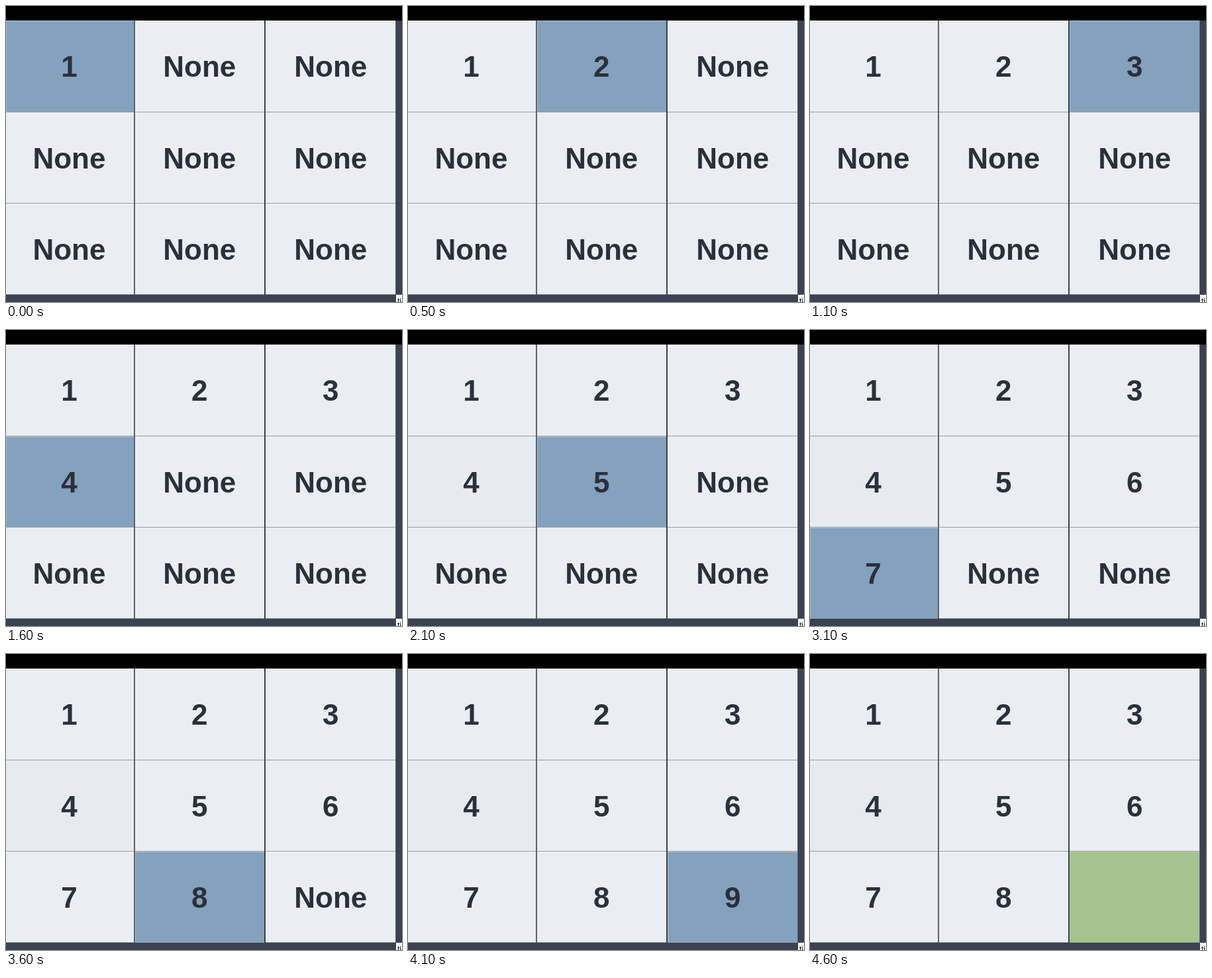
These frames come from a looping animation (598 px wide and 448 px high, 4.9 s). An HTML page:

```html
<!DOCTYPE html>
<html lang="en">
<head>
<meta charset="utf-8">
<title>Grid fill</title>
<style>
  html, body { margin: 0; width: 100%; height: 100%; overflow: hidden; background: #3b4252; }
  svg { display: block; width: 598px; height: 448px; }
  rect { shape-rendering: crispEdges; }
  .value { font: bold 44px "Liberation Sans", Arial, sans-serif; text-anchor: middle; fill: #2b303c; }
  .corner { font: 12px "Liberation Sans", Arial, sans-serif; fill: #111; }
</style>
</head>
<body>
<svg id="stage" viewBox="0 0 598 448"></svg>
<script>
const LOOP = 4900;
const STARTS = [0, 500, 1100, 1600, 2100, 2600, 3100, 3600, 4100];
const DONE = 4600;
const COLUMNS = [
  { x: 0, width: 193, center: 95.4 },
  { x: 195, width: 195, center: 292.3 },
  { x: 392, width: 196, center: 490.3 }
];
const ROWS = [
  { y: 23, height: 137, baseline: 107 },
  { y: 161, height: 137, baseline: 245.5 },
  { y: 299, height: 137, baseline: 384 }
];
const PLAIN = '#eaedf2', VISITED = '#e7eaef', ACTIVE = '#84a1bd', FINISHED = '#a5c38e';
const stage = document.getElementById('stage');

function add(tag, attributes, text = '') {
  const node = document.createElementNS('http://www.w3.org/2000/svg', tag);
  for (const [key, value] of Object.entries(attributes)) node.setAttribute(key, value);
  node.textContent = text;
  return stage.appendChild(node);
}

function box(x, y, width, height, fill) {
  return add('rect', { x, y, width, height, fill });
}

box(0, 0, 598, 22, '#000');
box(0, 22, 588, 415, PLAIN);

const cells = STARTS.map((start, index) => {
  const column = COLUMNS[index % 3], row = ROWS[Math.floor(index / 3)];
  return {
    start,
    end: STARTS[index + 1] ?? LOOP,
    visited: index === 3 ? VISITED : PLAIN,
    fill: box(column.x, row.y, column.width, row.height, PLAIN),
    top: box(column.x, row.y - (row.y === 23 ? 1 : 0), column.width, 1, '#b3c7da'),
    left: box(column.x, row.y, 1, row.height, '#a3bad0'),
    label: add('text', { class: 'value', x: column.center, y: row.baseline })
  };
});

for (const y of [160, 298, 436]) box(0, y, 588, 1, '#9b9da1');
box(193, 22, 2, 415, '#5f6369');
box(390, 22, 2, 415, '#3a3f49');
box(588, 22, 1, 415, '#5d6370');
box(589, 437, 9, 11, '#f4f5f6');
add('text', { class: 'corner', x: 591, y: 451 }, 'ti');

function draw(time) {
  cells.forEach((cell, index) => {
    const reached = time >= cell.start;
    const active = reached && time < cell.end;
    const finished = index === 8 && time >= DONE;
    const edge = active ? 'visible' : 'hidden';
    cell.fill.setAttribute('fill',
      finished ? FINISHED : active ? ACTIVE : reached ? cell.visited : PLAIN);
    cell.top.setAttribute('visibility', edge);
    cell.left.setAttribute('visibility', edge);
    cell.top.setAttribute('fill', finished ? '#c3d6b4' : '#b3c7da');
    cell.left.setAttribute('fill', finished ? '#b8cfa6' : '#a3bad0');
    cell.label.textContent = finished ? '' : reached ? index + 1 : 'None';
  });
}

const origin = performance.now();
function tick() {
  draw((performance.now() - origin) % LOOP);
  requestAnimationFrame(tick);
}
tick();
</script>
</body>
</html>
```
